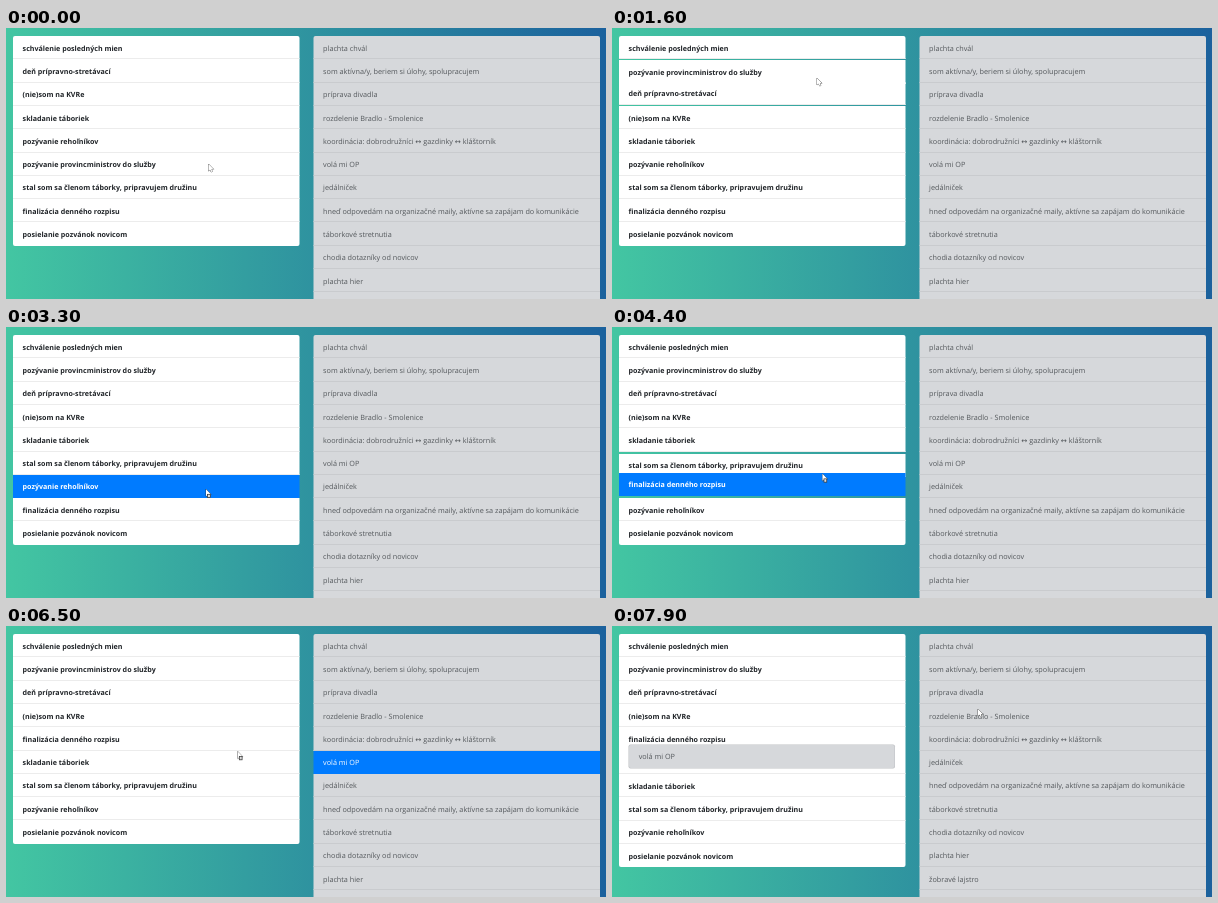
Animation of 600 by 271 pixels, one loop 8000 ms. Source, as an HTML page with a canvas:

```html
<!DOCTYPE html>
<html lang="sk">
<head>
<meta charset="utf-8">
<style>
  html, body { margin: 0; overflow: hidden; }
  canvas { display: block; }
</style>
</head>
<body>
<canvas width="600" height="271"></canvas>
<script>
const ctx = document.querySelector('canvas').getContext('2d');
const LOOP = 8000, STEP = 100, SLIDE = 155, TRAVEL = 700, POWER = 1.35;
const TOP = 8, ROW = 23.3, NEST = 23.6, WIDTH = 286.5;
const LEFT_X = 7, RIGHT_X = 307.5;
const BLUE = '#007bff', GREY = '#d6d8db', INK = '#212529', DIM = '#53575b';

const tasks = [
  'schválenie posledných mien', 'deň prípravno-stretávací', '(nie)som na KVRe',
  'skladanie táboriek', 'pozývanie rehoľníkov', 'pozývanie provincministrov do služby',
  'stal som sa členom táborky, pripravujem družinu', 'finalizácia denného rozpisu',
  'posielanie pozvánok novicom'
];
const answers = [
  'plachta chvál', 'som aktívna/y, beriem si úlohy, spolupracujem', 'príprava divadla',
  'rozdelenie Bradlo - Smolenice', 'koordinácia: dobrodružníci ↔ gazdinky ↔ kláštorník',
  'volá mi OP', 'jedálniček',
  'hneď odpovedám na organizačné maily, aktívne sa zapájam do komunikácie',
  'táborkové stretnutia', 'chodia dotazníky od novicov', 'plachta hier', 'žobravé lajstro', ''
];
const guest = answers[5], host = tasks[7];

// Each drag pulls an item from one point to another, then may hold it before the drop.
const drags = [
  { item: tasks[5], grab: 300, time: 1300, hold: 0, from: [202.5, 136], to: [205, 50] },
  { item: tasks[4], grab: 2850, time: 900, hold: 0, from: [200, 138], to: [200, 178] },
  { item: host, grab: 4200, time: 700, hold: 0, from: [209, 160], to: [213, 124] },
  { item: guest, grab: 6000, time: 800, hold: 600, from: [383, 138], to: [177, 121] }
];
const rest = { grab: 7900, from: [366, 83] };
const dropTime = d => d.grab + d.time + d.hold;

const clamp = v => Math.max(0, Math.min(1, v));
const mix = (a, b, k) => a + (b - a) * k;
const mixPoint = (p, q, k) => p.map((v, i) => mix(v, q[i], k));
const smooth = k => k * k * (3 - 2 * k);
const easeOut = k => 1 - (1 - k) ** POWER;
const easeOutInverse = k => 1 - (1 - k) ** (1 / POWER);
const rowAt = y => Math.floor((y - TOP) / ROW);

// An item changes place when the pointer crosses into the next row.
const moves = drags.flatMap(({ item, grab, time, from: [, y0], to: [, y1] }) => {
  const dir = Math.sign(y1 - y0), found = [];
  for (let row = rowAt(y0); row !== rowAt(y1); row += dir) {
    const edge = TOP + ROW * (dir > 0 ? row + 1 : row);
    const at = grab + time * easeOutInverse((edge - y0) / (y1 - y0));
    found.push({ at, item, to: row + dir });
  }
  return found;
});
const nestTime = moves.find(m => m.item === guest).at;

function pointer(t) {
  const next = drags.findIndex(d => t < d.grab);
  const last = drags[(next < 0 ? drags.length : next) - 1];
  if (!last) return drags[0].from;
  if (t < dropTime(last)) {
    return mixPoint(last.from, last.to, easeOut(clamp((t - last.grab) / last.time)));
  }
  const goal = drags[next] || rest;
  const start = Math.max(dropTime(last), goal.grab - TRAVEL);
  return mixPoint(last.to, goal.from, smooth(clamp((t - start) / (goal.grab - start))));
}

function layout(order, nested) {
  const tops = {};
  let y = TOP;
  for (const name of order) {
    tops[name] = y;
    y += ROW + (nested && name === host ? NEST : 0);
  }
  return tops;
}

function slide(before, now, age) {
  const tops = {};
  for (const name in now) tops[name] = mix(before[name], now[name], clamp(age / SLIDE));
  return tops;
}

function leftList(t) {
  const order = [...tasks];
  let now = layout(order), before = now, since = 0;
  for (const { at, item, to } of moves.filter(m => m.at <= t)) {
    before = now;
    since = at;
    if (item !== guest) order.splice(to, 0, order.splice(order.indexOf(item), 1)[0]);
    now = layout(order, item === guest);
  }
  return { order, tops: slide(before, now, t - since) };
}

function rightList(t) {
  const all = layout(answers);
  if (t < nestTime) return { order: answers, tops: all };
  const order = answers.filter(name => name !== guest);
  return { order, tops: slide(all, layout(order), t - nestTime) };
}

function label(text, x, y, color, bold) {
  ctx.font = (bold ? 'bold 7.13px' : '7.25px') + ' "Open Sans", "Noto Sans", "DejaVu Sans", sans-serif';
  ctx.fillStyle = color;
  ctx.fillText(text, x, y);
}

function box(x, y, w, h, radii, color) {
  ctx.fillStyle = color;
  ctx.beginPath();
  ctx.roundRect(x, y, w, h, radii);
  ctx.fill();
}

function drawList({ order, tops }, x, held, { fill, ink, line, bold, nested }) {
  const drawRow = name => {
    const i = order.indexOf(name), active = name === held;
    const y = Math.round(tops[name]);
    const end = Math.round(tops[name] + ROW + (nested && name === host ? NEST : 0));
    const r0 = i === 0 ? 2 : 0, r1 = i === order.length - 1 ? 2 : 0;
    box(x, y, WIDTH, end - y, [r0, r0, r1, r1], active ? BLUE : fill);
    if (!active && !r1) box(x, end - 1, WIDTH, 1, 0, line);
    label(name, x + 9.6, tops[name] + 14.6, active ? '#fff' : ink, bold);
  };
  order.filter(name => name !== held).forEach(drawRow);
  if (order.includes(held)) drawRow(held);
}

function drawGuest(y, active) {
  box(16.5, y, 266.5, 24, 2, active ? BLUE : '#bfc1c4');
  if (!active) box(17, y + .5, 265.5, 23, 2, GREY);
  label(guest, 26.7, y + 14.6, active ? '#fff' : DIM, false);
}

const arrow = new Path2D('M0 0V7L1.6 5.6L2.7 8L3.8 7.5L2.8 5.2H5Z');

function drawPointer([x, y], dragging) {
  ctx.save();
  ctx.translate(x, y);
  ctx.lineWidth = .7;
  ctx.strokeStyle = '#333';
  ctx.fillStyle = '#fff';
  ctx.stroke(arrow);
  ctx.fill(arrow);
  if (dragging) {
    ctx.fillStyle = '#ddd';
    ctx.fillRect(1.5, 5, 2.8, 3.3);
    ctx.strokeRect(1.5, 5, 2.8, 3.3);
  }
  ctx.restore();
}

const backdrop = ctx.createLinearGradient(0, 0, 600, 0);
backdrop.addColorStop(0, '#43c6a2');
backdrop.addColorStop(1, '#1b619d');

function draw(t) {
  const held = drags.find(d => t >= d.grab && t < dropTime(d))?.item;
  const nested = t >= nestTime, left = leftList(t);
  ctx.textRendering = 'geometricPrecision';
  ctx.fillStyle = backdrop;
  ctx.fillRect(0, 0, 600, 271);
  drawList(left, LEFT_X, held, { fill: '#fff', ink: INK, line: '#ececec', bold: true, nested });
  drawList(rightList(t), RIGHT_X, held, { fill: GREY, ink: DIM, line: '#c9cbce' });
  if (nested) drawGuest(left.tops[host] + 17.3, held === guest);
  drawPointer(pointer(t), held);
}

function tick() {
  const t = performance.now() % LOOP;
  draw(Math.floor(t / STEP) * STEP);
  requestAnimationFrame(tick);
}
tick();
</script>
</body>
</html>
```
